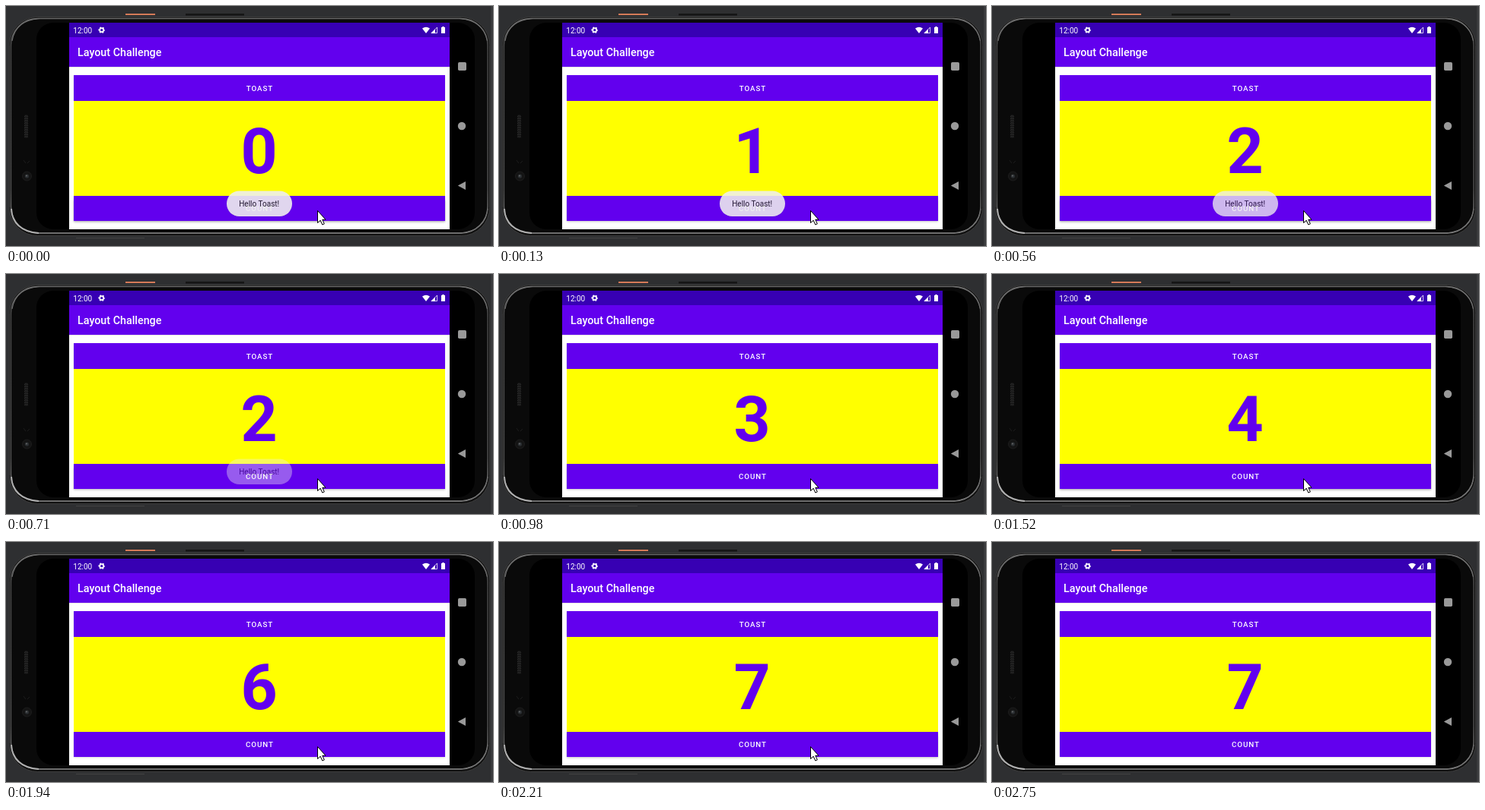
Write an HTML page that moves like this. It is 640 px wide and 316 px high and loops after 3.47 s.

```html
<!DOCTYPE html>
<html lang="en">
<head>
<meta charset="utf-8">
<title>Layout Challenge</title>
<style>
  html, body { margin: 0; width: 100%; height: 100%; overflow: hidden; background: #2e2f31; }
  svg { display: block; width: 640px; height: 316px; }
  text { font-family: Roboto, sans-serif; fill: #fff; }
  .label { font-size: 9.8px; font-weight: 500; letter-spacing: .893px; text-anchor: middle; }
  #digit { font-size: 84px; font-weight: 700; fill: #6200ee; text-anchor: middle; }
</style>
</head>
<body>
<svg viewBox="0 0 640 316">
  <defs>
    <linearGradient id="rim" x1="0" y1="0" x2="0" y2="1">
      <stop offset="0" stop-color="#6a6a6a"/>
      <stop offset=".15" stop-color="#484848"/>
      <stop offset=".8" stop-color="#505050"/>
      <stop offset="1" stop-color="#8c8c8c"/>
    </linearGradient>
    <pattern id="mesh" width="2" height="3" patternUnits="userSpaceOnUse">
      <path d="M0 2L2 0" stroke="#333" stroke-width=".8"/>
    </pattern>
    <filter id="soft" x="-5%" y="-50%" width="110%" height="200%"><feGaussianBlur stdDeviation="1"/></filter>
    <filter id="wide" x="-5%" y="-50%" width="110%" height="200%"><feGaussianBlur stdDeviation="1.8"/></filter>
    <clipPath id="screen"><rect x="83" y="22" width="500" height="272"/></clipPath>
  </defs>

  <!-- phone body -->
  <rect width="640" height="316" fill="#2e2f31"/>
  <rect x="637" width="3" height="316" fill="#3b3c3e"/>
  <rect x="157" y="10" width="39" height="2" fill="#d47a58"/>
  <rect x="236" y="10" width="77" height="2.500" fill="#151515"/>
  <path d="M92 305.500H182" stroke="#444"/>
  <rect x="4.500" y="14.500" width="631" height="288" rx="37" fill="#101010" stroke="#3c3c3c"/>
  <rect x="6.500" y="16.500" width="626.500" height="282.500" rx="35" fill="#0a0a0a" stroke="url(#rim)" stroke-width="1.400"/>
  <path d="M7 267C8 286 20 297 43 299" fill="none" stroke="#b0b0b0" stroke-width="2"/>
  <path d="M633 267C631 286 619 297 597 299M8 46C11 28 23 18 44 16.500M596 16.500C617 18 629 28 632.500 46" fill="none" stroke="#707070" stroke-width="1.200"/>
  <rect x="40" y="22" width="576" height="272" rx="22" fill="#000"/>
  <rect x="24" y="143" width="5" height="31" rx="2" fill="#151515"/>
  <rect x="24" y="143" width="5" height="31" rx="2" fill="url(#mesh)"/>
  <path d="M23 203l3 4M28 207l3-3" stroke="#1d1d1d"/>
  <circle cx="27.500" cy="224" r="6" fill="#141414" stroke="#1d1d1d"/>
  <circle cx="27.500" cy="224" r="2.600" fill="#2b2f33"/>
  <circle cx="27" cy="223.500" r="1" fill="#666"/>

  <!-- navigation -->
  <g fill="#999">
    <rect x="594" y="74" width="11" height="11" rx="1.800"/>
    <circle cx="599" cy="158" r="5.200"/>
    <path d="M593.800 236.500L604 231V242Z"/>
  </g>

  <!-- app -->
  <g clip-path="url(#screen)">
    <rect x="83" y="22" width="500" height="272" fill="#fff"/>
    <rect x="83" y="80" width="500" height="1" fill="#000" opacity=".1"/>
    <rect x="83" y="41" width="500" height="39" fill="#6200ee"/>
    <rect x="83" y="22" width="500" height="19" fill="#3700b3"/>
    <text x="88.300" y="35.600" font-size="10">12:00</text>
    <g fill="none" stroke="#fff">
      <circle cx="125.700" cy="31.700" r="2.500" stroke-width="1.700"/>
      <circle cx="125.700" cy="31.700" r="3.700" stroke-width="1.300" stroke-dasharray="1.937" stroke-dashoffset="1"/>
    </g>
    <g fill="#fff">
      <path d="M547 29.500Q552 25.800 557 29.500L552 36Z"/>
      <path d="M564 30.500V36H558.500Z"/>
      <path d="M566.600 28V35.600H559Z" fill="none" stroke="#fff" stroke-width=".8"/>
      <path d="M573.300 27h2.400v1h1.300v8h-5v-8h1.300z"/>
    </g>
    <text x="94" y="66.300" font-size="14.3" font-weight="500">Layout Challenge</text>

    <rect x="89" y="92" width="488" height="33" filter="url(#soft)" opacity=".1"/>
    <rect x="89" y="251" width="488" height="32.500" filter="url(#soft)" opacity=".12"/>
    <rect id="shade" x="89" y="256" width="488" height="28.500" filter="url(#wide)"/>
    <rect x="89" y="91" width="488" height="34" fill="#6200ee"/>
    <rect x="89" y="125" width="488" height="125" fill="#ff0"/>
    <rect x="89" y="250" width="488" height="33" fill="#6200ee"/>
    <text class="label" x="333.400" y="111.600">TOAST</text>
    <text class="label" x="333.400" y="270.400">COUNT</text>
    <text id="digit" x="332.700" y="220.200">0</text>

    <g id="toast">
      <rect x="290" y="244.500" width="86" height="33" rx="16.500" fill="#000" opacity=".12"/>
      <rect x="290" y="243.500" width="86" height="33.500" rx="16.500" fill="#eee"/>
      <text x="332.700" y="264" font-size="10" text-anchor="middle" style="fill:#1c1c1c">Hello Toast!</text>
    </g>
  </g>

  <path id="cursor" d="M.5 .5V16.500L4.200 13.200L6.800 19L9.300 17.900L6.800 12.200H11Z" fill="#fff" stroke="#000" stroke-width="1" stroke-linejoin="round"/>
</svg>
<script>
  const LOOP = 3470;
  const byId = id => document.getElementById(id);
  const digit = byId('digit'), shade = byId('shade'), toast = byId('toast'), cursor = byId('cursor');

  // Each track is a list of [start in ms, value...], held until the next entry.
  const counts = [0, 130, 560, 980, 1250, 1670, 1940, 2210];
  const toastTrack = [[0, .9], [130, .88], [560, .77], [710, .38], [830, 0]];
  const shadeTrack = [[0, .24], [130, .1], [560, .24], [710, .16], [830, .1], [1250, .06], [1400, .14],
    [1520, .24], [1670, .1], [1790, .2], [1940, .04], [2210, .12], [2360, .04], [2480, 0]];
  const cursorTrack = [[0, 409, 269], [2360, 431, 274], [2480, 491, 291], [2630, 561, 306], [2750, 660, 330]];

  const held = (track, t) => track.filter(step => step[0] <= t).pop();

  function draw() {
    const t = performance.now() % LOOP;
    digit.textContent = counts.filter(start => start <= t).length - 1;
    toast.setAttribute('opacity', held(toastTrack, t)[1]);
    shade.setAttribute('opacity', held(shadeTrack, t)[1]);
    const [, x, y] = held(cursorTrack, t);
    cursor.setAttribute('transform', `translate(${x} ${y})`);
    requestAnimationFrame(draw);
  }
  draw();
</script>
</body>
</html>
```
